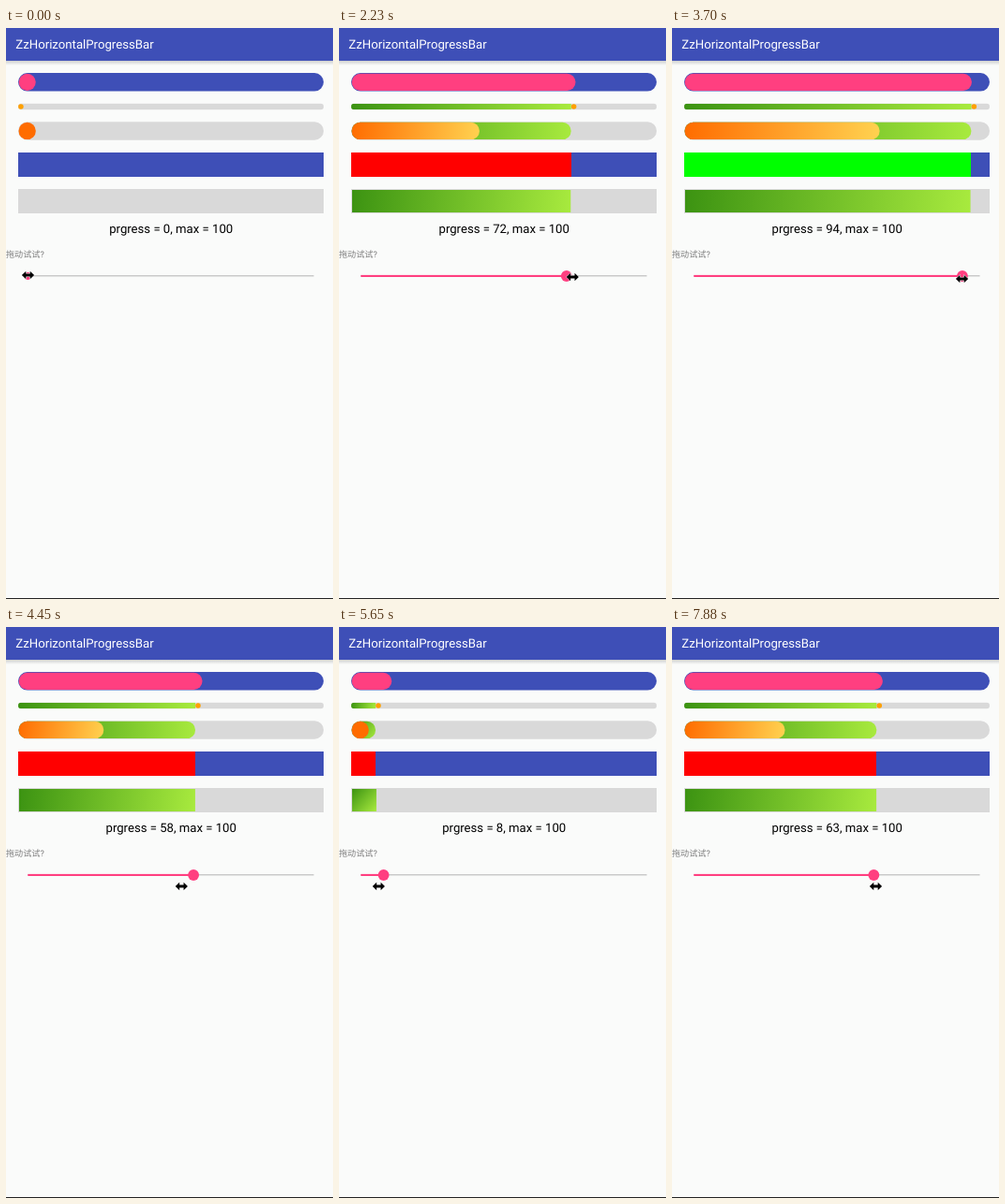
These frames come from a looping animation (349x610 px, 8 s). An HTML page:

```html
<!DOCTYPE html>
<html lang="zh-CN">
<head>
<meta charset="utf-8">
<title>Progress bars</title>
<style>
  html, body { margin: 0; width: 100%; height: 100%; overflow: hidden; background: #fafbfa; }
  svg { display: block; width: 100%; height: 100%; }
  text { font-family: Roboto, "Noto Sans CJK SC", sans-serif; text-rendering: geometricPrecision; }
  .indigo { fill: #3e4fb7; }
  .grey { fill: #d9d9d9; }
  .pink { fill: #ff3f80; }
</style>
</head>
<body>
<svg viewBox="0 0 349 610">
  <defs>
    <linearGradient id="shade" x2="0" y2="1">
      <stop offset="0" stop-color="#000" stop-opacity=".17"/>
      <stop offset="1" stop-color="#000" stop-opacity="0"/>
    </linearGradient>
    <clipPath id="thinClip"><rect x="13" y="80.8" width="326" height="6.4" rx="3.2"/></clipPath>
  </defs>
  <rect width="349" height="610" fill="#fafbfa"/>
  <rect y="35" width="349" height="5" fill="url(#shade)"/>
  <rect class="indigo" width="349" height="35"/>
  <text x="10.3" y="22" font-size="13.2" fill="#fff">ZzHorizontalProgressBar</text>

  <rect class="indigo" x="13" y="48.1" width="326" height="19.5" rx="9.75"/>
  <rect class="pink" id="pill" x="13.65" y="48.75" height="18.2" rx="9.1"/>

  <rect class="grey" x="13" y="80.8" width="326" height="6.4" rx="3.2"/>
  <rect id="thin" x="13" y="80.8" height="6.4" clip-path="url(#thinClip)"/>
  <circle id="dot" cy="84" r="2.8" fill="#ffa000"/>

  <rect class="grey" x="13" y="100.2" width="326" height="19.5" rx="9.75"/>
  <rect id="first" x="13.5" y="100.8" height="18.3" rx="9.15"/>
  <rect id="second" x="13.5" y="100.8" height="18.3" rx="9.15"/>

  <rect class="indigo" x="13" y="133" width="326" height="26"/>
  <rect id="flat" x="13" y="133" height="26"/>

  <rect class="grey" x="13" y="172" width="326" height="26"/>
  <rect id="block" x="14" y="173" height="24"/>

  <text id="label" x="176.2" y="219" font-size="13.15" text-anchor="middle" fill="#000"></text>
  <text x="0" y="245.3" font-size="9.1" fill="#7c7c7c">拖动试试?</text>

  <rect x="23.3" y="264.2" width="305.2" height="1.2" fill="#bdbdbd"/>
  <rect class="pink" id="seek" x="23.3" y="263.9" height="2.1"/>
  <circle class="pink" id="thumb" cy="265"/>
  <path id="cursor" d="M-6.6 0L-2.2-4.2V-1.4H2.2V-4.2L6.6 0L2.2 4.2V1.4H-2.2V4.2Z"
        fill="#000" stroke="#fff" stroke-width="1" paint-order="stroke"/>
  <rect y="609" width="349" height="1" fill="#222"/>
</svg>
<script>
const LOOP = 8000, STEP = 148.7;   // the picture refreshes once per STEP
const PRESS = 1030, LAG = 70;      // the thumb follows the pointer with a delay
const LEFT = 13, WIDTH = 326;
const SEEK_LEFT = 23.2, SEEK_UNIT = 3.05;
const $ = id => document.getElementById(id);
const set = (el, attrs) => { for (const k in attrs) el.setAttribute(k, attrs[k]); };
const clamp = (v, lo, hi) => Math.min(hi, Math.max(lo, v));

// Turning points of the pointer: [time, position].
const pointerX = [
  [0, 23.5], [290, 35.5], [440, 35.5], [740, 19.5], [890, 19.5],
  [1930, 218.5], [3110, 339.5], [3260, 340.5], [3600, 310], [3720, 309.5],
  [4460, 187.5], [5580, 48], [5950, 18.5], [6240, 12.5], [6690, 12.5],
  [6910, 131.2], [7840, 217.5]
];
const pointerY = [[440, 264], [740, 269], [2230, 266], [3720, 268], [4460, 277]];

function along(keys, t) {
  const next = keys.findIndex(key => key[0] >= t);
  if (next === 0) return keys[0][1];
  if (next < 0) return keys[keys.length - 1][1];
  const [t0, a] = keys[next - 1], [t1, b] = keys[next];
  return a + (b - a) * (t - t0) / (t1 - t0);
}

function progressAt(t) {
  if (t < PRESS) return 0;
  const x = along(pointerX, t - LAG);
  return Math.round(clamp((x - SEEK_LEFT) / SEEK_UNIT, 0, 100));
}

// Corner-to-corner gradient fill that follows the width of its bar.
function gradientBar(id, from, to) {
  const bar = $(id), [x, y, height] = ["x", "y", "height"].map(k => +bar.getAttribute(k));
  const NS = "http://www.w3.org/2000/svg";
  const grad = document.createElementNS(NS, "linearGradient");
  set(grad, { id: id + "Grad", gradientUnits: "userSpaceOnUse", x1: x, y1: y, y2: y + height });
  [from, to].forEach((color, i) => {
    const stop = document.createElementNS(NS, "stop");
    set(stop, { offset: i, "stop-color": color });
    grad.append(stop);
  });
  document.querySelector("defs").append(grad);
  return (width, min = 0) => {
    set(grad, { x2: x + width });
    set(bar, { width: Math.max(width, min), fill: width > 0 ? `url(#${id}Grad)` : from });
  };
}

const DARK = "#3c9312", LIGHT = "#a8ea3e";
const setThin = gradientBar("thin", DARK, LIGHT);
const setFirst = gradientBar("first", DARK, LIGHT);
const setBlock = gradientBar("block", DARK, LIGHT);
const setSecond = gradientBar("second", "#ff6c00", "#ffd250");

function draw(time) {
  const t = Math.floor(time / STEP + 0.2) * STEP;
  const p = progressAt(t), part = p / 100, width = WIDTH * part;

  set($("pill"), { width: 18.1 + 306.6 * part });
  setThin(width);
  set($("dot"), { cx: LEFT + 2.9 + width });
  setFirst(width - 0.5, p ? 18.3 : 0);
  setSecond(WIDTH * Math.max(0, part - 0.3) - 0.5, 18.3);
  set($("flat"), { width: Math.round(width), fill: p > 80 ? "#0f0" : "#f00" });
  setBlock(324 * part);
  $("label").textContent = `prgress = ${p}, max = 100`;

  const x = SEEK_LEFT + SEEK_UNIT * p;
  set($("seek"), { width: Math.max(0, x - 23.3) });
  set($("thumb"), { cx: x, r: t < PRESS ? 3.9 : 5.9 });
  set($("cursor"), { transform: `translate(${along(pointerX, t)} ${along(pointerY, t)})` });
}

const start = performance.now();
function frame() {
  draw((performance.now() - start) % LOOP);
  requestAnimationFrame(frame);
}
frame();
</script>
</body>
</html>
```
